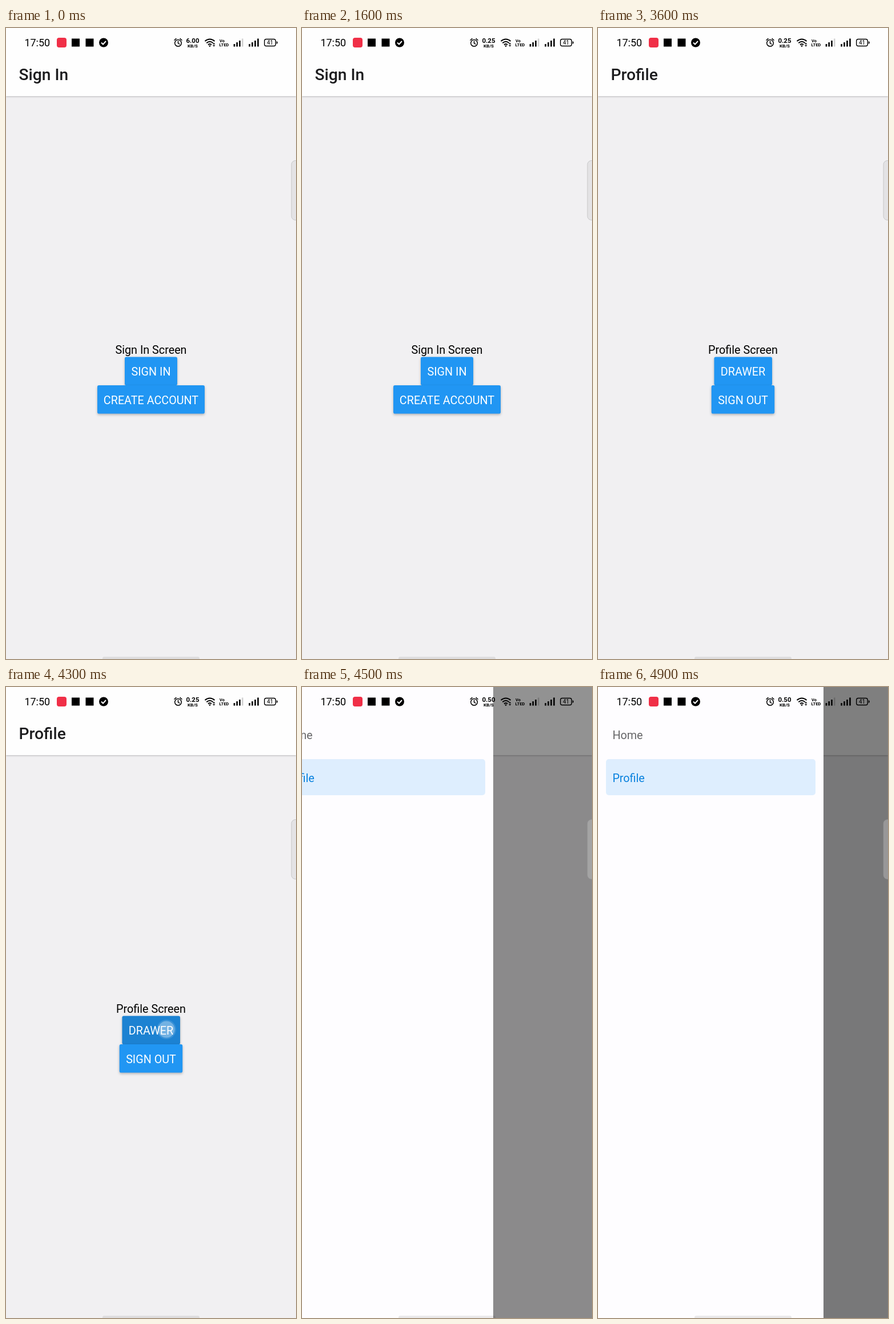
Recreate the animation shown at these times as an HTML page. Size 508 by 1102 pixels, loop 5000 ms.

```html
<!DOCTYPE html>
<html lang="en">
<head>
<meta charset="utf-8">
<title>Sign in and drawer</title>
<style>
@property --open { syntax: "<number>"; inherits: true; initial-value: 0; }

html, body { margin: 0; width: 100%; height: 100%; overflow: hidden; background: #f1f0f2; }
svg { display: block; width: 508px; height: 1102px; font: 19.75px Roboto, sans-serif; }

/* Every animation holds its pose between steps of 100 ms. */
.stage, .early, .mid, .late, .sign-in, .profile, .press, .touch {
  animation: 5s step-end infinite;
}
.stage { animation-name: open; }
.early { animation-name: early; }
.mid { animation-name: mid; }
.late { animation-name: late; }
.sign-in { animation-name: sign-in; }
.profile { animation-name: profile; }
.press { animation-name: press; fill: #000; }
.touch { animation-name: touch; }

.drawer { transform: translateX(calc((var(--open) - 1) * 395px)); }
.dim { opacity: calc(var(--open) * .5); }

.header { fill: #fefefe; filter: drop-shadow(0 1px 1.5px rgba(0, 0, 0, .24)); }
.title { font-size: 28.2px; font-weight: 500; fill: #1c1c1e; }
.center { text-anchor: middle; }
.label { fill: #fff; }
.button { fill: #2196f3; filter: drop-shadow(0 2px 2px rgba(0, 0, 0, .26)); }
.bold { font-weight: 700; }
.line { fill: none; stroke: #000; }

/* Critically damped spring, starting at 4318 ms */
@keyframes open {
  0% { --open: 0; }
  88% { --open: .4506; }
  90% { --open: .848; }
  92% { --open: .967; }
  94% { --open: .993; }
  96% { --open: .9986; }
  98%, 100% { --open: 1; }
}
@keyframes early { 0% { opacity: 1; } 8%, 100% { opacity: 0; } }
@keyframes mid { 0% { opacity: 0; } 8% { opacity: 1; } 88%, 100% { opacity: 0; } }
@keyframes late { 0% { opacity: 0; } 88%, 100% { opacity: 1; } }
@keyframes sign-in { 0% { opacity: 1; } 52%, 100% { opacity: 0; } }
@keyframes profile { 0% { opacity: 0; } 52%, 100% { opacity: 1; } }
@keyframes press {
  0% { opacity: 0; }
  46% { opacity: .06; }
  48% { opacity: .13; }
  52% { opacity: 0; }
  82% { opacity: .06; }
  84% { opacity: .13; }
  90%, 100% { opacity: 0; }
}
@keyframes touch {
  0% { opacity: 0; }
  46% { opacity: .5; }
  48% { opacity: 1; }
  52% { opacity: .75; }
  54% { opacity: 0; }
  82% { opacity: .5; }
  84% { opacity: 1; }
  88% { opacity: .5; }
  90%, 100% { opacity: 0; }
}
</style>
</head>
<body>
<svg class="stage" viewBox="0 0 508 1102">
  <rect width="508" height="1102" fill="#f1f0f2"/>
  <rect class="header" y="-10" width="508" height="129"/>

  <g class="sign-in">
    <text class="title" x="22.6" y="90.5">Sign In</text>
    <text class="center" x="254" y="569">Sign In Screen</text>
    <rect class="button" x="208" y="574.5" width="92" height="49.5" rx="2.8"/>
    <rect class="press" x="208" y="574.5" width="92" height="49.5" rx="2.8"/>
    <rect class="button" x="160" y="624" width="188" height="49.5" rx="2.8"/>
    <text class="label center" x="254" y="607">SIGN IN</text>
    <text class="label center" x="254" y="656.5">CREATE ACCOUNT</text>
  </g>

  <g class="profile">
    <text class="title" x="22.6" y="90.5">Profile</text>
    <text class="center" x="254" y="569">Profile Screen</text>
    <rect class="button" x="203.5" y="574.5" width="101.5" height="49.5" rx="2.8"/>
    <rect class="press" x="203.5" y="574.5" width="101.5" height="49.5" rx="2.8"/>
    <rect class="button" x="198.7" y="624" width="110.5" height="49.5" rx="2.8"/>
    <text class="label center" x="254" y="607">DRAWER</text>
    <text class="label center" x="254" y="656.5">SIGN OUT</text>
  </g>

  <g class="touch" fill="#fff">
    <circle cx="281" cy="598" r="17" opacity=".12"/>
    <circle cx="281" cy="598" r="14.5" opacity=".3"/>
  </g>

  <rect class="dim" width="508" height="1102"/>

  <g class="drawer">
    <rect width="395" height="1102" fill="#fefdff"/>
    <text x="25.4" y="91" fill="#666668">Home</text>
    <rect x="14" y="126" width="367" height="63" rx="5" fill="#deeefe"/>
    <text x="25.4" y="165.5" fill="#0a82de">Profile</text>
  </g>

  <rect x="500" y="231.5" width="20" height="104" rx="7" fill="#cdcdcf" fill-opacity=".37" stroke="#969698" stroke-opacity=".4"/>
  <rect x="169" y="1098" width="170" height="8" rx="3" fill-opacity=".08"/>

  <g class="status">
    <text x="32.4" y="32" font-size="18">17:50</text>
    <rect x="89" y="17" width="17" height="17" rx="4" fill="#f02f47"/>
    <rect x="115" y="18.5" width="14" height="14"/>
    <rect x="139.5" y="18.5" width="14" height="14"/>
    <circle cx="171" cy="25.5" r="8"/>
    <path d="M167 25.5l3 3 5-5.5" fill="none" stroke="#fff" stroke-width="2"/>

    <g class="line" stroke-width="1.5" stroke-linecap="round">
      <circle cx="301.5" cy="26.3" r="5.8"/>
      <path d="M301.5 23v3.7l2.4 1.5M295 21.2l3-2.6M308 21.2l-3-2.6"/>
    </g>

    <g class="bold center">
      <g font-size="11.5">
        <text class="early" x="327" y="26">6.00</text>
        <text class="mid" x="327" y="26">0.25</text>
        <text class="late" x="327" y="26">0.50</text>
      </g>
      <text x="327" y="33.5" font-size="8">KB/S</text>
    </g>

    <g class="line" stroke-width="2">
      <path d="M348.5 23q8.5-7 17 0M351.3 26.2q5.7-4.8 11.4 0M354 29.2q3-2.4 6 0"/>
    </g>
    <path d="M354.8 30.5h4.4l-2.2 2.7zM362 28.4l2.2-2.6 2.2 2.6zM362 30l2.2 2.6 2.2-2.6z"/>

    <g class="bold" font-size="7.4">
      <text x="374" y="25.2">Vo</text>
      <text x="373.6" y="32.4">LTED</text>
    </g>

    <path d="M398.7 28h2.6v4.5h-2.6zM403.4 25h2.6v7.5h-2.6zM408.2 22h2.6v10.5h-2.6z"/>
    <path d="M413 18.5h2.6v14H413z" opacity=".17"/>
    <path d="M425.3 28h2.6v4.5h-2.6zM430.2 25h2.6v7.5h-2.6zM435.2 22h2.6v10.5h-2.6zM440.2 18.5h2.6v14h-2.6z"/>

    <rect class="line" x="452.7" y="19.5" width="19.6" height="12" rx="3.2" stroke-width="1.4"/>
    <path d="M473.8 23q2 .4 2 2.5t-2 2.5z"/>
    <text class="center" x="462.5" y="29" font-size="10">41</text>
  </g>
</svg>
</body>
</html>
```
